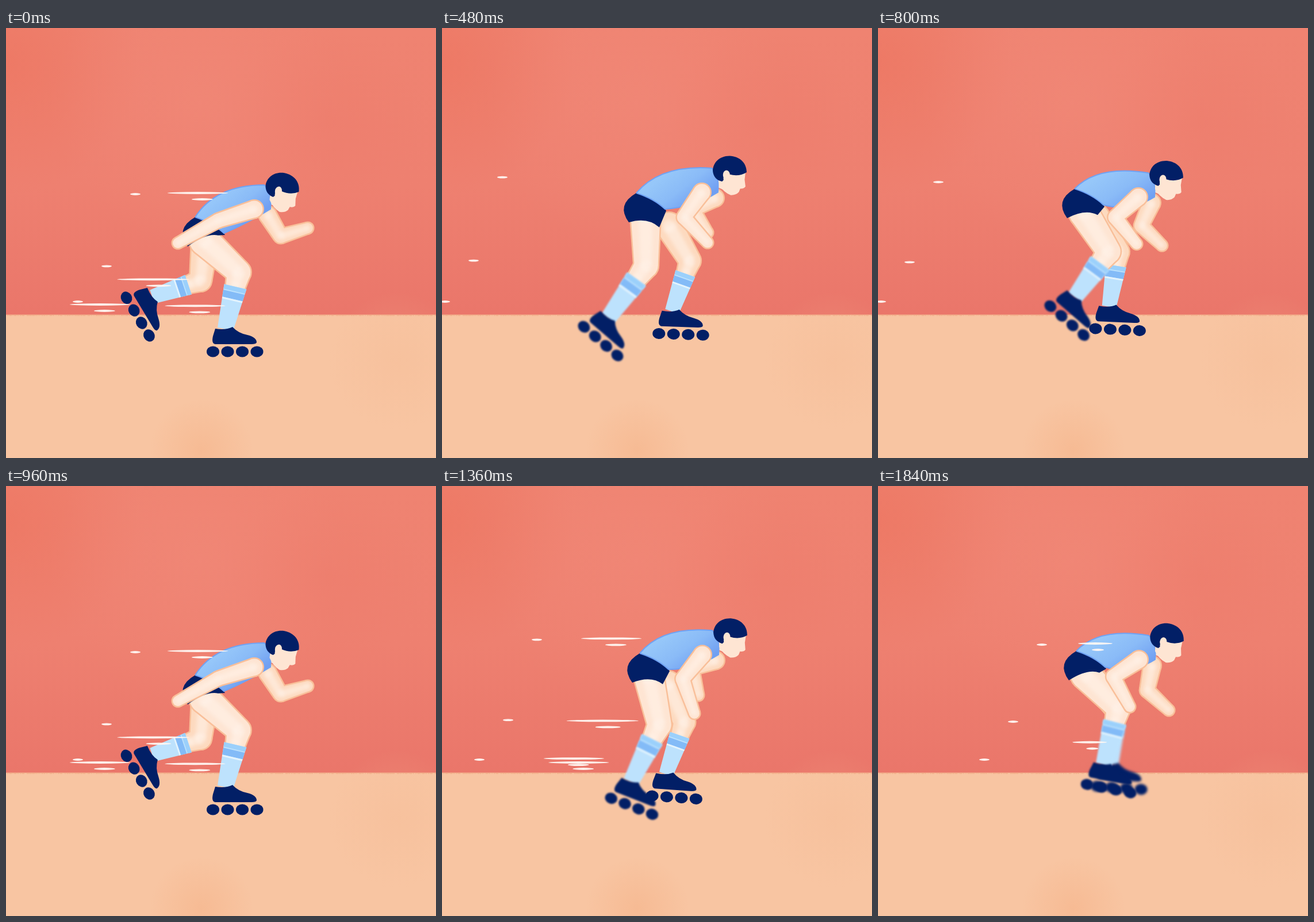
An HTML page with a canvas for the animation above (1920 ms loop, 748 px wide and 748 px high).

```html
<!DOCTYPE html>
<html lang="en">
<head>
<meta charset="utf-8">
<title>Roller skater</title>
<style>
  html, body { margin: 0; width: 100%; height: 100%; overflow: hidden; background: #ee8070; }
  canvas { display: block; width: 100vw; height: 100vh; }
</style>
</head>
<body>
<canvas id="stage" width="748" height="748"></canvas>
<script>
const ctx = document.getElementById('stage').getContext('2d');
const NAVY = '#021f66', SKIN = '#fee5d3', FAR_SKIN = '#fddabf', EDGE = '#f9bf99';
const STEP = 80, STEPS = 12, TAU = Math.PI * 2;

// Key poses of one stride; everything else follows from these points. Feet end in an angle.
const keys = [
  { step: 0, head: [481, 279], hip: [345, 370], nearFoot: [382, 522, 0], farFoot: [256, 467, 59],
    nearHand: [299, 374], farHand: [525, 348] },
  { step: 3, head: [491, 262], hip: [350, 338], nearFoot: [380, 519, 2], farFoot: [297, 449, 70],
    nearHand: [342, 382], farHand: [470, 412] },
  { step: 4, head: [503, 265], hip: [366, 336], nearFoot: [369, 523, 2], farFoot: [380, 508, 6],
    nearHand: [416, 418], farHand: [430, 372] },
  { step: 7, head: [500, 242], hip: [348, 324], nearFoot: [251, 493, 60], farFoot: [411, 483, 0],
    nearHand: [485, 351], farHand: [478, 348] },
  { step: 8, head: [500, 242], hip: [352, 306], nearFoot: [244, 436, 101], farFoot: [395, 483, 0],
    nearHand: [474, 359], farHand: [470, 355] },
  { step: 11, head: [503, 266], hip: [361, 328], nearFoot: [393, 483, 11], farFoot: [406, 483, 4],
    nearHand: [438, 384], farHand: [506, 390] }
];
keys.push({ ...keys[0], step: STEPS });

const mix = (a, b, u) => a + (b - a) * u;
const mixAll = (a, b, u) => a.map((v, i) => mix(v, b[i], u));
const shift = ([x, y], dx, dy) => [x + dx, y + dy];
const distance = (a, b) => Math.hypot(b[0] - a[0], b[1] - a[1]);

function poseAt(step) {
  step %= STEPS;
  const i = keys.findIndex(k => k.step > step), a = keys[i - 1], b = keys[i];
  const u = (step - a.step) / (b.step - a.step), pose = {};
  for (const part in a) if (part !== 'step') pose[part] = mixAll(a[part], b[part], u);
  return pose;
}

// Elbow or knee: bends further out the closer the two ends come.
function joint(a, b, at, reach, side) {
  const d = distance(a, b), out = side * Math.max(0, (reach - d) / 2) / d;
  return shift(mixAll(a, b, at), (b[1] - a[1]) * out, (a[0] - b[0]) * out);
}

function oval(x, y, rx, ry, color) {
  ctx.fillStyle = color;
  ctx.beginPath();
  ctx.ellipse(x, y, rx, ry, 0, 0, TAU);
  ctx.fill();
}

// Straight-ended tapered strip.
function strip(a, b, ra, rb, color) {
  const d = distance(a, b) || 1;
  const nx = (a[1] - b[1]) / d, ny = (b[0] - a[0]) / d;
  ctx.fillStyle = color;
  ctx.beginPath();
  ctx.moveTo(a[0] + nx * ra, a[1] + ny * ra);
  ctx.lineTo(b[0] + nx * rb, b[1] + ny * rb);
  ctx.lineTo(b[0] - nx * rb, b[1] - ny * rb);
  ctx.lineTo(a[0] - nx * ra, a[1] - ny * ra);
  ctx.fill();
}

function chain(pts, radii, grow, color) {
  pts.forEach((p, i) => {
    const r = radii[i] + grow;
    oval(...p, r, r, color);
    if (i) strip(pts[i - 1], p, radii[i - 1] + grow, r, color);
  });
}

function flesh(pts, radii, color) {
  chain(pts, radii, 1, EDGE);
  chain(pts, radii, -1.5, color);
  ctx.save();
  ctx.globalAlpha = 0.6;
  ctx.filter = 'blur(3px)';
  chain(pts, radii.map(r => r * 0.45), 0, '#fff2e8');
  ctx.restore();
}

function skate([x, y, degrees]) {
  ctx.save();
  ctx.translate(x, y);
  ctx.rotate(degrees / 360 * TAU);
  ctx.fillStyle = NAVY;
  ctx.beginPath();
  ctx.moveTo(-18, 1);
  ctx.quadraticCurveTo(0, 4, 12, -2);
  ctx.quadraticCurveTo(22, 9, 38, 12);
  ctx.quadraticCurveTo(54, 16, 54, 25);
  ctx.quadraticCurveTo(53, 28, 45, 28);
  ctx.lineTo(-18, 28);
  ctx.quadraticCurveTo(-25, 27, -22, 14);
  ctx.fill();
  for (let i = 0; i < 4; i++) oval(-22 + 25.5 * i, 41, 11, 9.5, NAVY);
  ctx.restore();
}

function leg(hip, knee, foot, nextFoot, color, scale) {
  const width = u => mix(22, 14, u) * scale;
  const along = u => mixAll(knee, foot, u);
  const part = (u, v, c) => strip(along(u), along(v), width(u), width(v), c);
  const top = 0.26, blur = Math.min(2, distance(foot, nextFoot) / 30);
  flesh([hip, knee, along(top)], [27 * scale, 22 * scale, 18 * scale], color);
  ctx.save();
  ctx.filter = `blur(${blur}px)`;
  part(top, 1.02, '#bde2fd');
  part(top, 0.34, '#9bd0fb');
  part(0.36, 0.48, '#83bbf7');
  part(0.48, 0.51, '#e3f3fd');
  skate(foot);
  ctx.restore();
}

const arm = (shoulder, hand, reach, color) =>
  flesh([shoulder, joint(shoulder, hand, 0.45, reach, -1), hand], [16, 13.5, 10.5], color);

// Curve that passes through a middle point.
function through(a, m, b) {
  ctx.quadraticCurveTo(2 * m[0] - (a[0] + b[0]) / 2, 2 * m[1] - (a[1] + b[1]) / 2, ...b);
}

function body(hip, neck, swing) {
  const waist = shift(hip, -16, -41), front = shift(waist, 50, 28);
  const back = shift(mixAll(waist, neck, 0.5), -12, -14);
  const chest = shift(neck, 11, 42), belly = shift(chest, -42, 26);
  const middle = shift(mixAll(waist, front, 0.5), 6, -4);
  const hem = shift(hip, -29, 10), crotch = shift(hip, 24, -10 + swing * 0.7);

  ctx.fillStyle = NAVY;
  ctx.beginPath();
  ctx.moveTo(...waist);
  through(waist, shift(waist, -21, 23), hem);
  ctx.quadraticCurveTo(...shift(mixAll(hem, crotch, 0.5), 6, -14), ...crotch);
  ctx.lineTo(...shift(front, 2, 3));
  ctx.lineTo(...shift(middle, 0, -8));
  ctx.fill();

  const shade = ctx.createLinearGradient(...back, ...belly);
  shade.addColorStop(0, '#96c7f9');
  shade.addColorStop(0.5, '#8abbf7');
  shade.addColorStop(1, '#709ff2');
  ctx.beginPath();
  ctx.moveTo(...waist);
  through(waist, back, neck);
  ctx.quadraticCurveTo(...shift(neck, 14, 10), ...chest);
  ctx.quadraticCurveTo(...belly, ...front);
  ctx.quadraticCurveTo(...middle, ...waist);
  ctx.fillStyle = shade;
  ctx.fill();
  ctx.strokeStyle = '#6fa2f4';
  ctx.lineWidth = 2;
  ctx.stroke();
}

function head([x, y]) {
  ctx.save();
  ctx.translate(x, y);
  ctx.rotate((y - 242) / 180);
  ctx.fillStyle = SKIN;
  ctx.beginPath();
  ctx.moveTo(27, 0);
  ctx.lineTo(26, 13);
  ctx.lineTo(28, 25);
  ctx.quadraticCurveTo(26, 29, 19, 29);
  ctx.lineTo(17, 35);
  ctx.quadraticCurveTo(12, 41, 3, 41);
  ctx.quadraticCurveTo(-10, 36, -18, 24);
  ctx.lineTo(-20, 0);
  ctx.fill();
  ctx.fillStyle = NAVY;
  ctx.beginPath();
  ctx.moveTo(29, 0);
  ctx.bezierCurveTo(28, -17, 15, -27, -2, -27);
  ctx.bezierCurveTo(-20, -26, -30, -14, -30, 0);
  ctx.quadraticCurveTo(-28, 15, -13, 18);
  ctx.quadraticCurveTo(-8, 12, -1, 5);
  ctx.quadraticCurveTo(16, 9, 29, 0);
  ctx.fill();
  oval(-6, 6, 6, 8, SKIN);
  oval(-7, 12, 4, 6, SKIN);
  ctx.restore();
}

function streak(left, right, y) {
  oval((left + right) / 2, y, (right - left) / 2, 1.9, 'rgba(255,248,244,.94)');
}

// A long and a short streak that stretch out, then drift off behind.
function wake(x, y, length, age) {
  const right = x - 60 * Math.max(0, age - 1), left = right - length - 45 * Math.min(age, 1);
  if (age > 2) return;
  streak(left, right, y);
  streak(mix(left, right, 0.4), mix(left, right, 0.75), y + 11);
}

function wakes(pose, farKnee, calf, nearLeads, step) {
  const age = (step + 1) % 4;
  const [x, y] = pose.head;
  wake(x - 95, y + 8, 60, age);
  wake(calf[0] - 12, calf[1] + 10, 60, age);
  if (nearLeads) {
    wake(farKnee[0] - 20, farKnee[1] - 2, 80, age);
    wake(pose.farFoot[0] - 40, 481, 60, age);
  }
  for (let i = 0; i < 3; i++) {
    const dot = 285 - 50 * i - 60 * age;
    streak(dot - 9, dot + 9, mix(y + 10, 476, [0, 0.67, 1][i]));
  }
}

function glow(x, y, r, rgb, alpha) {
  const g = ctx.createRadialGradient(x, y, 0, x, y, r);
  g.addColorStop(0, `rgba(${rgb},${alpha})`);
  g.addColorStop(1, `rgba(${rgb},0)`);
  ctx.fillStyle = g;
  ctx.fillRect(x - r, y - r, 2 * r, 2 * r);
}

function backdrop() {
  const wall = ctx.createLinearGradient(0, 0, 0, 500);
  wall.addColorStop(0, '#ef8371');
  wall.addColorStop(0.55, '#ee8070');
  wall.addColorStop(1, '#ea766a');
  ctx.fillStyle = wall;
  ctx.fillRect(0, 0, 748, 500);
  glow(0, 60, 230, '236,112,90', 0.5);
  glow(340, 130, 260, '243,142,126', 0.35);
  glow(560, 160, 160, '236,118,102', 0.25);
  ctx.fillStyle = '#f8c5a2';
  ctx.fillRect(0, 499, 748, 249);
  glow(340, 735, 90, '245,178,136', 0.55);
  glow(680, 580, 120, '244,184,146', 0.3);
  ctx.fillStyle = '#f3b28d';
  for (let x = 0; x < 748; x += 2)
    ctx.fillRect(x, 498.5, 2, 1 + 1.5 * Math.abs(Math.sin(x * x)));
}

function draw(step) {
  const pose = poseAt(step), next = poseAt(step + 1);
  const { hip, nearFoot, farFoot } = pose;
  const swing = 21 - 23 * Math.cos((step - 1) / STEPS * TAU);
  const farHip = shift(hip, swing, swing * 0.4);
  const nearKnee = joint(hip, nearFoot, 0.43, 247, 1);
  const farKnee = joint(farHip, farFoot, 0.42, 215, 1);
  const neck = shift(pose.head, -32, -6);
  const nearLeads = step < STEPS / 2;
  const calf = nearLeads ? mixAll(nearKnee, nearFoot, 0.5) : mixAll(farKnee, farFoot, 0.5);

  backdrop();
  arm(shift(neck, 6, 52), pose.farHand, 130, FAR_SKIN);
  leg(farHip, farKnee, farFoot, next.farFoot, FAR_SKIN, 0.9);
  leg(hip, nearKnee, nearFoot, next.nearFoot, SKIN, 1);
  chain([shift(neck, 9, 19), shift(pose.head, -8, 20)], [13, 12], 0, SKIN);
  body(hip, neck, swing);
  head(pose.head);
  arm(shift(neck, -17, 42), pose.nearHand, 160, SKIN);
  wakes(pose, farKnee, calf, nearLeads, step);
}

let start, shown;
function tick(now) {
  start ??= now;
  const step = Math.floor((now - start) / STEP) % STEPS;
  if (step !== shown) draw(shown = step);
  requestAnimationFrame(tick);
}
requestAnimationFrame(tick);
</script>
</body>
</html>
```
